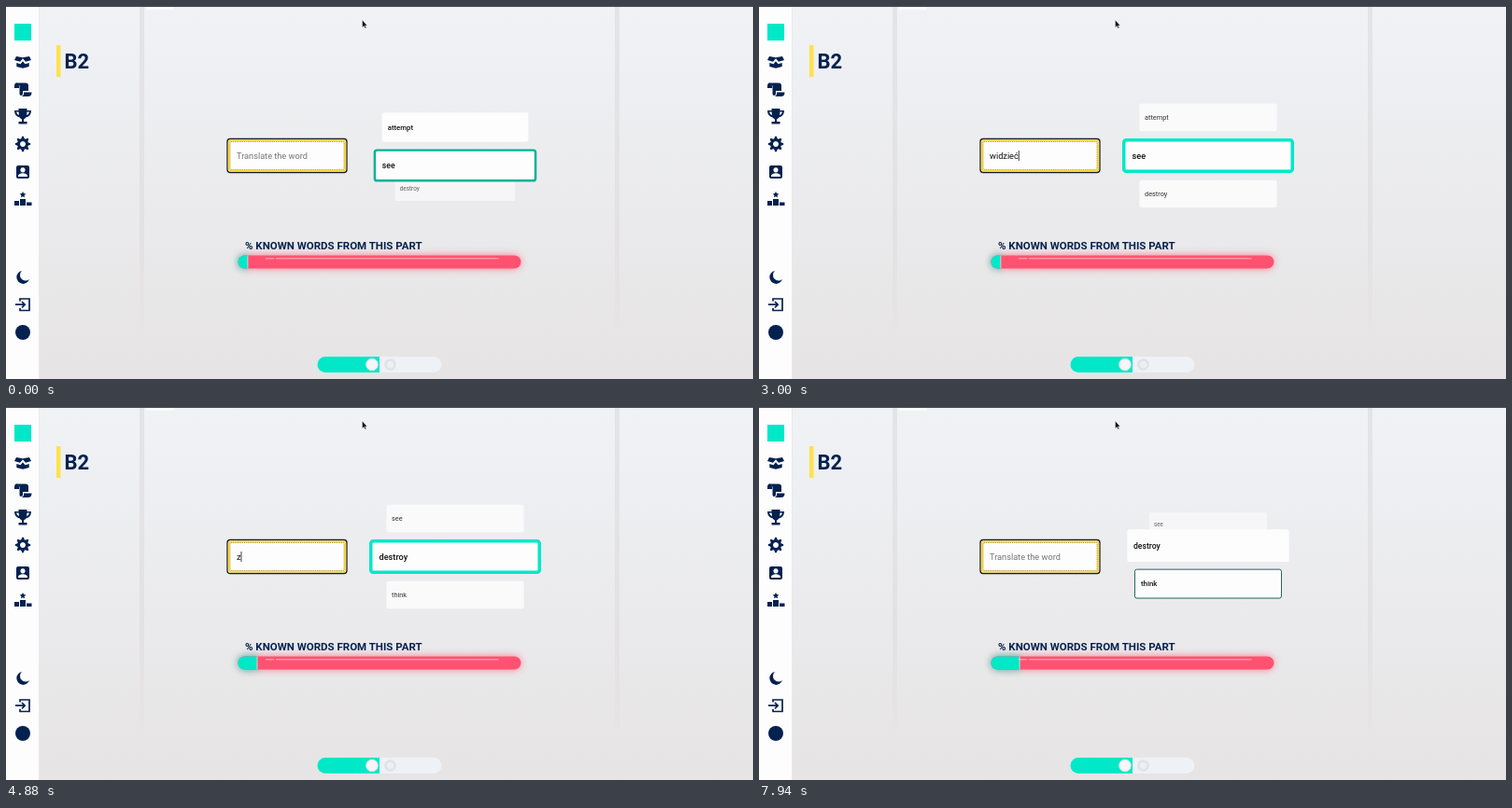
Animation, 800 px wide and 400 px high, one loop 8000 ms. Source, as an HTML page:

```html
<!DOCTYPE html>
<html lang="en">
<head>
<meta charset="utf-8">
<title>Vocabulary trainer</title>
<style>
  html, body { margin: 0; width: 100%; height: 100%; overflow: hidden; }
  svg { display: block; width: 800px; height: 400px; font-family: Roboto, sans-serif; }
  .icon { fill: #04214f; }
  .line { fill: none; stroke: #04214f; stroke-width: 1.7; }
  .heading { fill: #04214f; font-weight: 700; }
</style>
</head>
<body>
<svg viewBox="0 0 800 400">
  <defs>
    <linearGradient id="sky" x2="0" y2="1">
      <stop stop-color="#f0f2f6"/><stop offset=".5" stop-color="#ebebed"/><stop offset="1" stop-color="#e6e4e4"/>
    </linearGradient>
    <linearGradient id="band" x2="0" y2="1">
      <stop stop-color="#e4e4e7"/><stop offset=".7" stop-color="#e3e1e2"/><stop offset="1" stop-color="#e6e4e4"/>
    </linearGradient>
    <filter id="glow" x="-50%" y="-150%" width="200%" height="400%"><feGaussianBlur stdDeviation="4"/></filter>
  </defs>

  <rect width="800" height="400" fill="url(#sky)"/>
  <path d="M143 0h5v346h-5zM652 0h5v346h-5z" fill="url(#band)"/>
  <rect width="35" height="400" fill="#fdfdfe"/>
  <rect x="35" width="1" height="400" fill="#e9eaed"/>
  <rect x="150" y="1" width="30" height="3" rx="1" fill="#fafbfc"/>
  <rect width="800" height="1" fill="#4b4c58"/>

  <!-- sidebar -->
  <rect x="9" y="19" width="18" height="18" fill="#00e8c8"/>
  <g class="icon">
    <path d="M11 54l7 1.2 7-1.2 2 4-6 1.8-3-3.6-3 3.6-6-1.8zM11.300 61l4.200 1.200 2.500-3 2.500 3 4.200-1.200v4l-6.700 1.700-6.700-1.700z"/>
    <path d="M9 86c0-5 5-5 5 0v2H9zM12 82.500h9q3 0 3 3V91h-6v3q0 2-2 2-1.500 0-1.500-2v-8q0-2-2.500-3.500zM19 92.500h8.500q0 4.500-4 4.500H17q2-1 2-3z"/>
    <path d="M13.500 110h9v2H27q0 6-5.700 7.500-1 1.500-2.300 2v2.500h3.500v2.500h-9V124H17v-2.500q-1.300-.5-2.300-2Q9 118 9 112h4.500zM11 113.500q.5 2.500 3 3.500l-.5-3.500zm14 0h-2.500l-.5 3.500q2.500-1 3-3.500z" fill-rule="evenodd"/>
    <path id="gear"/>
    <path d="M13 171h10q2 0 2 2v10q0 2-2 2H13q-2 0-2-2v-10q0-2 2-2zm5 2.300a2.600 2.600 0 1 0 .01 0zM13 183h10v-1q-1-2.700-5-2.700T13 182z" fill-rule="evenodd"/>
    <path d="M18 199l1 2.100 2.300.3-1.700 1.600.4 2.300-2-1.100-2 1.100.4-2.300-1.700-1.600 2.300-.3zM15 207h6v7h-6zM9 209h5v5H9zM22 210.500h5.500v3.500H22z"/>
    <path d="M17 284a7 7 0 1 0 8 9 5.700 5.700 0 0 1-8-9z"/>
    <circle cx="18" cy="350" r="8"/>
  </g>
  <path class="line" d="M15 316.500V314h10v12.500H15V324M10 320.200h10M17 317l3.200 3.200-3.200 3.200"/>

  <!-- title, input -->
  <rect x="54" y="42" width="4.500" height="34" fill="#ffe14d"/>
  <text class="heading" x="62.500" y="67" font-size="22">B2</text>
  <rect x="237" y="142.500" width="128" height="36" rx="3" fill="#fff" stroke="#1b1b22" stroke-width="1.300"/>
  <rect x="239" y="144.500" width="124" height="32" rx="2" fill="#fdfdfe" stroke="#ffdc3c" stroke-width="2.200"/>
  <rect x="240" y="145.500" width="122" height="30" rx="1" fill="none" stroke="#5b5028" stroke-width=".5" stroke-dasharray="1"/>
  <text id="typed" x="247" y="163.500" font-size="9.200"></text>
  <rect id="caret" y="155" width=".8" height="11" fill="#111"/>

  <g id="cards"></g>

  <!-- known words -->
  <text class="heading" x="256" y="261" font-size="11.500">% KNOWN WORDS FROM THIS PART</text>
  <rect x="249" y="267.500" width="302" height="14" rx="7" fill="#ff5271" opacity=".75" filter="url(#glow)"/>
  <path class="fill" fill="#00e8c8" opacity=".8" filter="url(#glow)"/>
  <rect x="248.500" y="267.500" width="303" height="14" rx="7" fill="#ff5271"/>
  <path class="fill" fill="#00e8c8"/>
  <rect id="split" y="267.500" width=".8" height="14" fill="#e6e0df"/>
  <path d="M278.500 270.800h8M289.500 270.800h237.500" stroke="#fff" stroke-width="1.500" stroke-linecap="round" opacity=".38"/>

  <!-- switch -->
  <rect x="333.500" y="376" width="133" height="17" rx="8.500" fill="#eef1f6"/>
  <path d="M400 376h-58a8.500 8.500 0 0 0 0 17h58z" fill="#00e8c8"/>
  <circle cx="392" cy="384.500" r="6.200" fill="#f4f6f8" stroke="#dfe5e8" stroke-width="1.200"/>
  <circle cx="411.500" cy="384.500" r="5" fill="#eceff3" stroke="#dfe2e6" stroke-width="2.600"/>

  <path d="M381.500 15v8l1.800-1.600 1.300 2.700 1.200-.6-1.200-2.600h2.300z" fill="#111" stroke="#fff" stroke-width=".4"/>
</svg>

<script>
const LOOP = 8000, SLIDE = 500, BLINK = 600;
const WORDS = ['attempt', 'see', 'destroy', 'think'];
const SLIDES = [-223, 3530, 7842];
const CENTER_X = 481, CENTER_Y = 160.5, CARD_W = 184, CARD_H = 37;

const $ = selector => document.querySelector(selector);
const make = (tag, parent, attrs = {}) => {
  const node = document.createElementNS('http://www.w3.org/2000/svg', tag);
  set(node, attrs);
  return parent.appendChild(node);
};
function set(node, attrs) {
  for (const name in attrs) node.setAttribute(name, attrs[name]);
}

// CSS "ease", solved by bisection
function ease(x) {
  if (x <= 0) return 0;
  if (x >= 1) return 1;
  const bezier = (s, a, b) => 3 * (1 - s) ** 2 * s * a + 3 * (1 - s) * s * s * b + s ** 3;
  let low = 0, high = 1;
  for (let i = 0; i < 20; i++) {
    const mid = (low + high) / 2;
    if (bezier(mid, .25, .25) < x) low = mid; else high = mid;
  }
  return bezier(low, .1, 1);
}

// Keystrokes as [time, field content]
const keys = SLIDES.map(time => [time, '']);
const type = (word, times) => times.forEach((time, i) => keys.push([time, word.slice(0, i + 1)]));
type('widzieć', [1300, 1530, 1760, 2000, 2230, 2460, 2700]);
type('zniszczyć', [4800, 5050, 6430, 6610, 6790, 6970, 7150, 7330, 7540]);
keys.sort((a, b) => a[0] - b[0]);

// Gear: eight-toothed outline with a hole
const teeth = Array.from({ length: 32 }, (_, i) => {
  const angle = (i - .5) * Math.PI / 16, radius = i % 4 < 2 ? 8.2 : 6;
  return `${18 + radius * Math.cos(angle)} ${148 + radius * Math.sin(angle)}`;
});
set($('#gear'), { d: `M${teeth.join('L')}zM18 145a3 3 0 1 0 .01 0z`, 'fill-rule': 'evenodd' });

const cards = WORDS.map((word, index) => {
  const group = make('g', $('#cards'));
  const box = make('rect', group, { rx: 2.5 });
  const label = make('text', group, { y: 3.2, 'font-size': 9.2 });
  label.textContent = word;
  return { index, group, box, label };
});

function drawCards(t) {
  const position = SLIDES.reduce((sum, start) => sum + ease((t - start) / SLIDE), 0);
  const active = SLIDES.filter(start => t >= start).length;
  for (const card of cards) {
    const offset = card.index - position, near = Math.min(1, Math.abs(offset));
    const far = Math.min(1, Math.abs(offset) - near);
    const y = CENTER_Y + Math.sign(offset) * (41 * near - 21 * far);
    const scale = 1 - .2 * near - .4 * far;
    const focus = card.index === active ? 1 - near : 0;
    const border = 3.5 * focus;
    card.distance = Math.abs(offset);
    set(card.group, { transform: `translate(${CENTER_X} ${y}) scale(${scale})`, opacity: 1 - far });
    set(card.box, {
      x: (border - CARD_W) / 2, y: (border - CARD_H) / 2,
      width: CARD_W - border, height: CARD_H - border,
      fill: near < .9 ? '#fdfdfe' : '#fafafb', 'stroke-width': border,
      stroke: focus ? `color-mix(in srgb, #00e8c8 ${focus * 100}%, #111)` : 'none'
    });
    set(card.label, {
      x: -CARD_W / 2 + 7 + border, 'font-weight': near < .9 ? 500 : 400, fill: near < .9 ? '#111' : '#333'
    });
  }
  [...cards].sort((a, b) => b.distance - a.distance).forEach(card => $('#cards').append(card.group));
  return active;
}

function drawInput(t) {
  const [time, text] = keys.filter(key => key[0] <= t).pop();
  const field = $('#typed');
  field.textContent = text || 'Translate the word';
  set(field, { fill: text ? '#111' : '#757575' });
  const firstHalf = (t - time) % (2 * BLINK) < BLINK;
  set($('#caret'), {
    x: 247 + (text ? field.getComputedTextLength() : 0),
    opacity: firstHalf === Boolean(text) ? 1 : 0
  });
}

function drawProgress(known) {
  const end = 248.8 + 10.1 * known;
  document.querySelectorAll('.fill').forEach(path =>
    set(path, { d: `M${end} 267.5H255.5a7 7 0 0 0 0 14H${end}z` }));
  set($('#split'), { x: end - .4 });
}

function frame(now) {
  const t = now % LOOP;
  drawProgress(drawCards(t));
  drawInput(t);
  requestAnimationFrame(frame);
}
frame(0);
</script>
</body>
</html>
```
